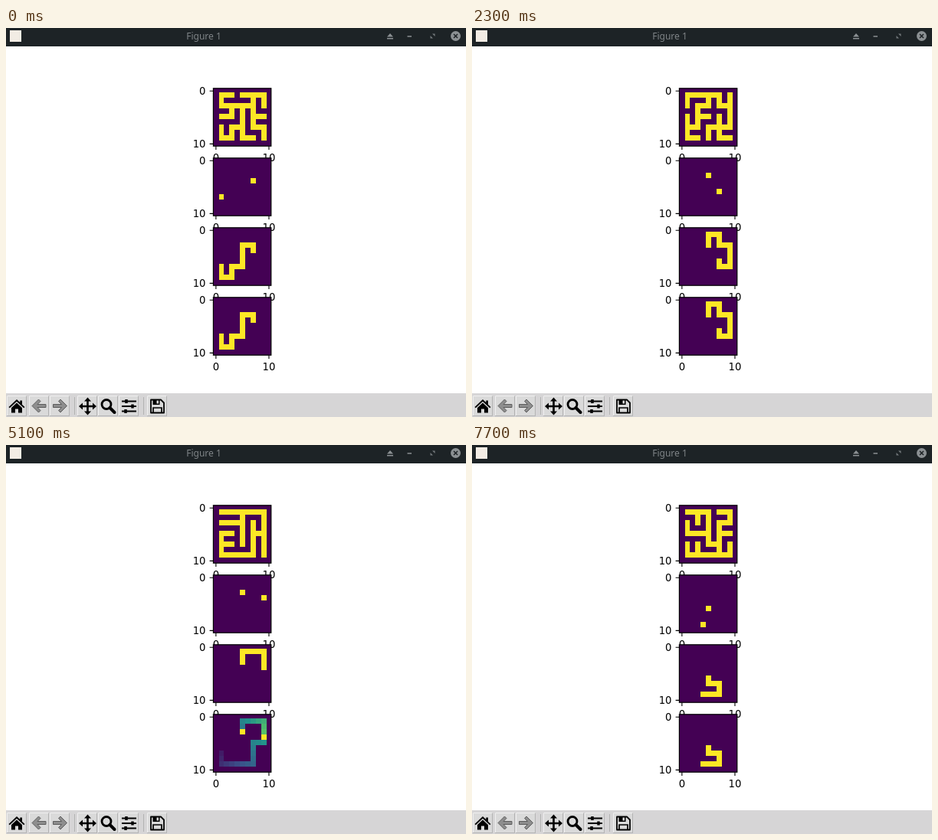
Animation, 600 px wide and 508 px high, one loop 8 s. Source, as an HTML page:

```html
<!DOCTYPE html>
<html lang="en">
<head>
<meta charset="utf-8">
<title>Figure 1</title>
<style>
  html, body { margin: 0; width: 100%; height: 100%; overflow: hidden; background: #fff; }
  svg { display: block; width: 600px; height: 508px; }
  .label { font: 13.2px "DejaVu Sans", sans-serif; }
  .title { font: 12px "Noto Sans", sans-serif; fill: #7f8487; }
  .cells { shape-rendering: crispEdges; }
  .ico { fill: none; stroke: #000; }
  .off { stroke: #5c5c5c; fill: #8e8e8e; }
</style>
</head>
<body>
<svg viewBox="0 0 600 508">
  <rect width="600" height="508" fill="#fff"/>
  <g id="plots"></g>

  <rect width="600" height="24" fill="#1d2326"/>
  <rect x="5" y="3" width="15" height="15" fill="#f2ece4"/>
  <text class="title" x="258" y="15" text-anchor="middle">Figure 1</text>
  <g fill="#8b9093">
    <path d="M497 11.5L501 7L505 11.5ZM497 13h8v1.6h-8Z"/>
    <rect x="523.5" y="10.2" width="5.5" height="1.5"/>
    <path d="M556 7.5h3.500v3.500ZM553.500 10v3.500h3.500Z" opacity=".8"/>
    <circle cx="586.5" cy="10.5" r="6.5"/>
    <path d="M584 8l5 5m0-5l-5 5" stroke="#1c2124" stroke-width="1.5"/>
  </g>

  <rect y="477" width="600" height="31" fill="#d6d5d6"/>
  <g id="buttons"></g>
  <path d="M89.5 482v23M179.5 482v23" stroke="#b2b2b2"/>

  <path d="M14 485L3.5 495l1.3 1.3L14 487.8l9.2 8.5l1.3-1.3l-3.5-3.3v-5.2h-2.7v2.6Z"/>
  <path d="M14 489.5L7 496v6.5h5v-5h4v5h5V496Z"/>
  <path id="arrow" class="off" d="M34 493.5l8.5-8.500l2.500 2.500l-4 4H52v4H41l4 4l-2.500 2.500Z"/>
  <use href="#arrow" transform="matrix(-1 0 0 1 113.500 0)"/>
  <path class="ico" stroke-width="2.6" d="M106.5 486v16M98 494h17"/>
  <path id="tips" d="M106.5 482.5l4.500 5h-9ZM106.5 505.500l4.500-5h-9Z"/>
  <use href="#tips" transform="rotate(90 106.5 494)"/>
  <circle class="ico" cx="131" cy="491.5" r="6" stroke-width="2.8"/>
  <path class="ico" d="M135.5 496l6 6" stroke-width="4" stroke-linecap="round"/>
  <path class="ico" d="M151 487.5h19m-19 6.500h19m-19 6.500h19" stroke-width="1.9"/>
  <path class="ico" d="M157 485v5M165 491.5v5M156 498v5" stroke-width="3.4"/>
  <path class="ico" d="M189 485.5h13l4 4v13h-17Z" stroke-width="1.8" stroke-linejoin="round"/>
  <path d="M191.5 485h9v7h-9Z"/>
  <rect x="196.5" y="486.5" width="2.5" height="4" fill="#d9d9d9"/>
  <path class="ico" d="M192 502v-6h11v6" stroke-width="1.7"/>
</svg>

<script>
const LOOP = 8000, STEP = 100;
const LEFT = 270.4, TOP = 78.8, PITCH = 91, SIZE = 75.4;
const N = 11, CELL = 6.91, CELL_X = LEFT + .2, CELL_DY = -1.4;
const VIRIDIS = [[68, 1, 84], [59, 82, 139], [33, 145, 140], [94, 201, 98], [253, 231, 37]];

const cell = (col, row) => row * N + col;
const mix = (a, b, k) => a + (b - a) * k;
const STRAY = cell(1, 7);

// Each maze is a set of corridors; everything else is derived by solving it.
const scenes = [
  { at: -900, end: 0, from: cell(7, 4), to: cell(1, 7),
    maze: "M3 1H1V3H7 M5 1H9V3 M7 1V7H9V9 M3 3V5H1 M5 3V9H7 M7 5H9 M5 7H3V9H1V7" },
  { at: 100, end: 2300, from: cell(7, 6), to: cell(5, 3),
    maze: "M1 3V1H7V3H9 M9 1V7H5V9 M5 1V3H3V7H1 M5 5H3 M1 5V9H3 M7 5V9H9" },
  { at: 3200, end: 4000, from: cell(3, 3), to: cell(1, 4),
    maze: "M3 1H1V9H3 M1 3H5V1H9 M3 3V5H5V9H7 M1 7H3 M5 7H9 M7 3V5H9 M9 3V9" },
  { at: 5000, end: 5700, from: cell(5, 3), to: cell(9, 4),
    maze: "M1 1H9V9 M5 1V7 M1 3H5 M7 3V9H1V5H3 M1 7H3 M7 5H9" },
  { at: 7000, end: 7700, from: cell(5, 6), to: cell(4, 9),
    maze: "M1 1H5V7H7 M3 1V3 M1 3V5H5 M7 1H9V3H7V9 M7 5H9 M1 7V9H9V7 M3 7V9" }
];

function carve(maze) {
  const open = new Set();
  let x, y;
  for (const [, cmd, a, b] of maze.matchAll(/([MHV])(\d)(?: (\d))?/g)) {
    if (cmd === "M") { x = +a; y = +b; }
    const tx = cmd === "H" ? +a : x, ty = cmd === "V" ? +a : y;
    open.add(cell(x, y));
    while (x !== tx || y !== ty) {
      x += Math.sign(tx - x);
      y += Math.sign(ty - y);
      open.add(cell(x, y));
    }
  }
  return open;
}

// Breadth-first search; returns the cells in order.
function route(open, from, to) {
  const next = new Map([[to, null]]), queue = [to];
  for (const i of queue) {
    for (const j of [i - 1, i + 1, i - N, i + N]) {
      if (open.has(j) && !next.has(j)) { next.set(j, i); queue.push(j); }
    }
  }
  const out = [];
  for (let i = from; i !== null; i = next.get(i)) out.push(i);
  return out;
}

for (const s of scenes) {
  const open = carve(s.maze);
  s.path = route(open, s.from, s.to);
  s.stray = route(open, s.to, STRAY);
  s.still = [open, [s.from, s.to], s.path].map(list => new Map([...list].map(i => [i, 1])));
}

function color(v) {
  const x = Math.min(1, Math.max(0, v)) * 4, i = Math.min(3, Math.floor(x));
  return `rgb(${VIRIDIS[i].map((a, n) => Math.round(mix(a, VIRIDIS[i + 1][n], x - i)))})`;
}

function make(parent, tag, attrs, text) {
  const el = document.createElementNS("http://www.w3.org/2000/svg", tag);
  for (const key in attrs) el.setAttribute(key, attrs[key]);
  if (text) el.textContent = text;
  parent.append(el);
  return el;
}

const plots = document.getElementById("plots");

function makePanel(n) {
  const y = TOP + PITCH * n, bottom = y + SIZE;
  const box = { x: LEFT, y, width: SIZE, height: SIZE };
  make(plots, "rect", { ...box, fill: color(0) });
  const layer = make(plots, "g", { class: "cells" });
  const cells = new Map();
  for (let row = 1; row < N - 1; row++) {
    for (let col = 1; col < N - 1; col++) {
      cells.set(cell(col, row), make(layer, "rect", {
        x: CELL_X + col * CELL, y: y + CELL_DY + row * CELL, width: CELL, height: CELL
      }));
    }
  }
  make(plots, "rect", { ...box, fill: "none", stroke: "#000", "stroke-width": 1.2 });
  for (const v of [0, 10]) {
    const d = (v + .5) * CELL;
    make(plots, "path", { d: `M${LEFT} ${y + d}h-4.8M${LEFT + d} ${bottom}v4.8`, stroke: "#000", "stroke-width": 1.1 });
    make(plots, "text", { class: "label", x: 260.5, y: y + d + 4.8, "text-anchor": "end" }, String(v));
    make(plots, "text", { class: "label", x: LEFT + d, y: bottom + 19.6, "text-anchor": "middle" }, String(v));
  }
  return cells;
}

const panels = [0, 1, 2, 3].map(makePanel);

const buttons = document.getElementById("buttons");
for (const x of [14, 43, 70, 106, 133, 160, 197]) {
  make(buttons, "rect", { x: x - 12.5, y: 480.5, width: 25, height: 26, fill: "#dadada", stroke: "#b4b4b4" });
  make(buttons, "path", { d: `M${x - 12.5} 506V480.5h25`, fill: "none", stroke: "#f0f0f0" });
}

function paint(cells, levels) {
  for (const [i, el] of cells) el.setAttribute("fill", color(levels.get(i) || 0));
}

// The guess brightens along the path while the stray trail fades out.
function guess(s, t) {
  const k = Math.min(1, (t - s.at) / (s.end - s.at)) ** 2;
  const out = new Map();
  s.stray.forEach((i, n) => out.set(i, mix(.55, .05, n / s.stray.length) * (1 - k)));
  s.path.forEach((i, n) => out.set(i, mix(mix(.35, .8, n / s.path.length), 1, k)));
  return out.set(s.from, 1).set(s.to, 1);
}

let shown = null, last = -1;

function draw(now) {
  const t = Math.floor((now % LOOP) / STEP) * STEP;
  if (t === last) return;
  last = t;
  const s = scenes.filter(x => x.at <= t).pop();
  if (s !== shown) s.still.forEach((levels, n) => paint(panels[n], levels));
  shown = s;
  paint(panels[3], guess(s, t));
}

const start = performance.now();
function tick() {
  draw(performance.now() - start);
  requestAnimationFrame(tick);
}
tick();
</script>
</body>
</html>
```
